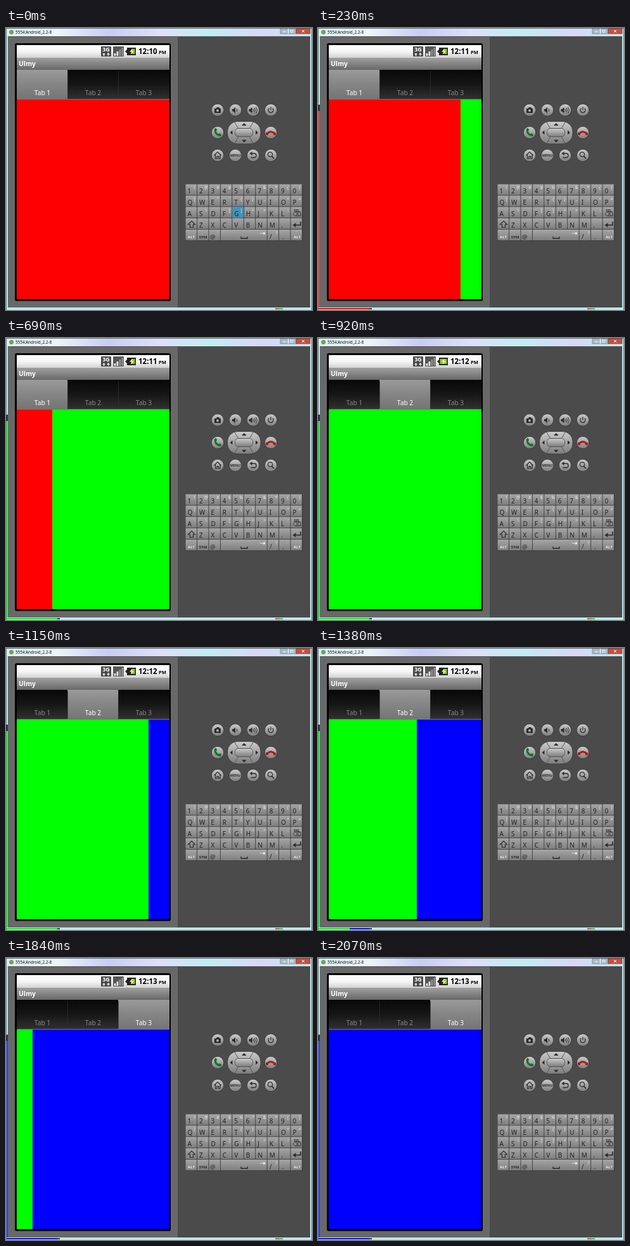
An HTML page that plays this animation: 483 by 445 pixels, repeating every 2300 ms.

```html
<!DOCTYPE html>
<html lang="en">
<head>
<meta charset="utf-8">
<title>Emulator</title>
<style>
  html, body { margin: 0; width: 100%; height: 100%; overflow: hidden; }
  svg { display: block; width: 483px; height: 445px; }
  text { font-family: "Noto Sans", "Open Sans", sans-serif; white-space: pre; }
</style>
</head>
<body>
<script>
const NS = "http://www.w3.org/2000/svg";
const RED = "#f00", GREEN = "#0f0", BLUE = "#00f";

function el(name, attrs, parent = svg) {
  const node = document.createElementNS(NS, name);
  for (const k in attrs) node.setAttribute(k, attrs[k]);
  if (parent) parent.append(node);
  return node;
}
const svg = el("svg", { viewBox: "0 0 483 445" }, document.body);
const defs = el("defs", {});

function gradient(id, stops, across = false) {
  const g = el("linearGradient", { id, x2: across ? 1 : 0, y2: across ? 0 : 1 }, defs);
  stops.forEach((c, i) => el("stop", { offset: i / (stops.length - 1), "stop-color": c }, g));
  return `url(#${id})`;
}
const rect = (x, y, width, height, fill, more = {}) =>
  el("rect", { x, y, width, height, fill, ...more });
const path = (d, fill, more = {}) => el("path", { d, fill, ...more });
const stroke = (d, color, width = 1) =>
  path(d, "none", { stroke: color, "stroke-width": width });
function text(str, x, y, size, fill, more = {}) {
  const t = el("text", { x, y, "font-size": size, fill, ...more });
  t.textContent = str;
  return t;
}
const MID = { "text-anchor": "middle" };

const glass = gradient("glass", ["#d8eef2", "#eef4fa", "#c9cdf2", "#dfdff8", "#c4ecf2", "#d9d8f6", "#bfe9f0"], true);
const bar = gradient("bar", ["#ffffff", "#f6f6f6", "#d2d2d2"]);
const titleFill = gradient("title", ["#a0a0a0", "#686868"]);
const tabOn = gradient("tabOn", ["#9a9a9a", "#858585", "#757575"]);
const tabOff = gradient("tabOff", ["#080808", "#161616", "#303030"]);
const button = gradient("button", ["#cccccc", "#7c7c7c"]);
const keyFill = gradient("key", ["#a6a6a6", "#7e7e7e"]);

// Window frame
rect(0, 0, 483, 445, "#bfe6ec");
rect(0, 0, 483, 13, glass);
rect(0, 0, 483, 1, "#4c7078");
rect(0, 1, 1, 444, "#5c8890");
rect(482, 1, 1, 444, "#5c8890");
el("circle", { cx: 8.5, cy: 6.5, r: 3.5, fill: "#7c9c54" });
text("5554:Android_2.2-8", 15, 9, 6.3, "#111", { "font-family": "sans-serif" });
rect(433, 1, 25, 8, "#a9bac8", { stroke: "#60717f", "stroke-width": .6 });
rect(458, 1, 22, 8, "#c85040", { stroke: "#702c24", "stroke-width": .6 });
stroke("M437 6H442M445.5 1V9", "#fff");
rect(449, 3.5, 4, 3, "none", { stroke: "#fff", "stroke-width": .8 });
stroke("M467 3L471 7M471 3L467 7", "#fff");

// Glass edges tinted by what lies behind the window
const side = rect(1, 131, 2, 310, RED);
const sideGap = rect(0, 121, 3, 10, "#26384c");
const edgeA = rect(1, 442, 1, 2, RED);
const edgeB = rect(1, 442, 1, 2, GREEN);
const edgeGap = rect(81, 442, 4, 2, "#243c40");
rect(425, 442, 6, 2, "#b06058");
rect(431, 442, 6, 2, "#48b860");

rect(3, 13, 268, 428, "#686868");
rect(271, 13, 209, 428, "#4b4b4b");
rect(3, 13, 477, 1, "#565656");

// Phone screen
rect(14, 24, 246, 407, "#000", { rx: 3 });
rect(17, 27, 241, 20, bar);
rect(17, 47, 241, 19, titleFill);
text("Ulmy", 20, 60, 10.3, "#fff", { "font-weight": 700 });

rect(150, 29, 16, 16, "#484848", { rx: 1 });
text("3G", 158, 37, 9, "#fff", { "font-weight": 700, ...MID });
path("M152 42L154.5 39L157 42H155.5V44H153.5V42ZM159 41H160.5V39H162.5V41H164L161.5 44Z", "#ddd");
rect(169, 29, 17, 16, "#555", { rx: 1 });
[4, 7, 10, 13].forEach((h, i) => rect(170.5 + i * 4, 44 - h, 2.8, h, i < 2 ? "#e4e4e4" : "#909090"));
path("M188 37L191 34V31H205V43H191V40Z", "#222");
const charge = rect(194, 33, 9, 8, "#8ccc20");
path("M199.5 32.5L195 37.5H198L196.5 41.5L202 36.5H199Z", "#fff8a0");

const clock = text("", 209, 41, 11.5, "#000", { "font-weight": 700 });
text("PM", 241, 41, 7.6, "#000", { "font-weight": 700 });

rect(17, 66, 241, 48, "#000");
const tabs = [0, 1, 2].map(i => ({
  box: rect(17 + i * 80, 66, i < 2 ? 80 : 81, 46, tabOff),
  label: text(`Tab ${i + 1}`, 57.5 + i * 80, 106, 10.2, "#888", MID)
}));
stroke("M97.5 68V111M177.5 68V111", "#333", .7);
rect(17, 112, 241, 1, "#777");
const pageA = rect(17, 113, 241, 315, RED);
const pageB = rect(17, 113, 0, 315, GREEN);

// Hardware buttons
const INK = "#2b2b2b";
function knob(x, y) {
  el("circle", { cx: x, cy: y, r: 9.7, fill: button, stroke: "#333", "stroke-width": .8 });
}
for (const y of [129.5, 165, 201])
  for (const x of [334, 362, 390, 418])
    if (y !== 165 || x === 334 || x === 418) knob(x, y);

path("M329 127H331.5L333 125H336L337.5 127H339V134H329Z", INK);
el("circle", { cx: 334, cy: 130.3, r: 2, fill: "#aaa" });
function speaker(x) {
  path(`M${x} 128H${x + 2}L${x + 5} 125V134.5L${x + 2} 131.5H${x}Z`, INK);
}
speaker(357);
stroke("M364 127.5Q366 130 364 132", INK);
speaker(383.5);
stroke("M390 127.5Q392 130 390 132M392 126Q395 130 392 133.5M394.3 125Q398 130 394.3 135", INK);
stroke("M415.3 126.5A4 4 0 1 0 420.7 126.5M418 124.5V129.5", INK, 1.3);
stroke("M330 160.5Q330 168.5 338.5 169.5", "#0a7424", 3);
path("M328.5 160L331 157.5L333.5 161L330.5 163ZM335 168L337.5 166L340.5 169L338 171.5Z", "#0a7424");
stroke("M411.5 167Q418 160.5 424.5 167", "#b01818", 3);
path("M410 165H414V169H410ZM422 165H426V169H422Z", "#b01818");
stroke("M328.5 201L334 195.5L339.5 201M330.5 200V206H333V202.5H335.5V206H338V200", INK, 1.2);
text("MENU", 362, 203.2, 5.4, INK, { "font-weight": 700, ...MID });
stroke("M387 198H392Q395 198 395 201.3T391.5 204.5H386.5", INK, 1.3);
path("M384.5 198L388.5 195V201Z", INK);
el("circle", { cx: 417, cy: 199.5, r: 3.6, fill: "none", stroke: INK, "stroke-width": 1.3 });
stroke("M419.5 202.3L423 206", INK, 1.7);

// Direction pad
rect(349.5, 147.5, 52.5, 35.5, button, { rx: 16, stroke: "#333", "stroke-width": .8 });
stroke("M361 149L367 159M390 149L384 159M361 182L367 171M390 182L384 171", "#585858");
rect(361.5, 158.5, 28, 13, button, { rx: 5, stroke: "#555" });
path("M372 154L375.8 150L379.6 154ZM372 176.5H379.6L375.8 180.5ZM357.5 161.5V168.5L353.5 165ZM394 161.5V168.5L398 165Z", INK);

// Keyboard
const KX = 283.5, KY = 246.5, KW = 18.45, KH = 17.9;
const rows = ["1234567890", "QWERTYUIOP", "ASDFGHJKL ", " ZXCVBNM. "];
const alts = ["!@#$%^&*()", "|~\"`{}_-+=", " \\ []<>;: ", ""];
rect(283, 246, 185.5, 90, "#3a3a3a", { rx: 1 });
function key(col, row, span = 1, fill = keyFill) {
  return rect(KX + col * KW, KY + row * KH, span * KW - .9, KH - .9, fill);
}
let hot;
rows.forEach((row, r) => [...row].forEach((ch, c) => {
  key(c, r);
  const x = KX + c * KW, y = KY + r * KH;
  if (ch === "G") hot = key(c, r, 1, "#4094be");
  text(ch, x + 3, y + 14.4, 10, "#222");
  const alt = alts[r][c];
  if (alt) text(alt, x + 14, y + 7.2, 6.5, "#eee", MID);
}));
text("DEL", 459, 289.5, 5, INK, { "font-weight": 700, ...MID });
stroke("M453 293.5L456 290.5H465V296.5H456ZM458 292L462 295M462 292L458 295", INK, .9);
stroke("M287.5 310L293 304.5L298.5 310H295.5V314.5H290.5V310Z", INK, 1.1);
stroke("M465 305.5V311H456", INK, 1.7);
path("M452.5 311L457.5 307.5V314.5Z", INK);

[[0, 1], [1, 1], [2, 1], [3, 4], [7, 1], [8, 1], [9, 1]].forEach(([c, span]) => key(c, 4, span));
for (const x of [292.5, 459.5])
  text("ALT", x, 332, 6, "#eee", { "font-weight": 600, ...MID });
text("SYM", 311, 332, 6, INK, { "font-weight": 700, ...MID });
text("@", 322, 332.5, 9.5, "#222");
text("/", 416, 332.5, 10, "#222");
text("?", 427, 325.5, 6.5, "#eee", MID);
text(".", 436, 332.5, 10, "#222");
stroke("M371 329V332H381V329", INK, 1.3);
stroke("M401 324H408M408.5 322V326", "#eee", .9);
path("M406 321.8L408.5 324L406 326.2Z", "#eee");

// split x, left page, right page, tab, minute, battery full, edge split
const STEP = 230;
const steps = [
  [258, RED, GREEN, 0, 10, 0, -1],
  [225, RED, GREEN, 0, 11, 0, 81],
  [155, RED, GREEN, 0, 11, 0, 33],
  [73, RED, GREEN, 0, 11, 0, 0],
  [17, RED, GREEN, 1, 12, 1, 0],
  [225, GREEN, BLUE, 1, 12, 0, 81],
  [156, GREEN, BLUE, 1, 12, 0, 49],
  [88, GREEN, BLUE, 1, 13, 1, 0],
  [42, GREEN, BLUE, 2, 13, 0, 0],
  [17, GREEN, BLUE, 2, 13, 0, 0]
];

function set(node, attrs) {
  for (const k in attrs) node.setAttribute(k, attrs[k]);
}

function show(n) {
  const [split, left, right, tab, minute, full, edge] = steps[n];
  set(pageA, { width: split - 17, fill: left });
  set(pageB, { x: split, width: 258 - split, fill: right });
  tabs.forEach(({ box, label }, i) => {
    set(box, { fill: i === tab ? tabOn : tabOff });
    set(label, { fill: i === tab ? "#fff" : "#888" });
  });
  clock.textContent = `12:${minute}`;
  set(charge, full ? { x: 192.5, width: 11 } : { x: 198, width: 5.5 });
  set(hot, { opacity: n === 0 ? 1 : 0 });

  const tint = edge < 0 ? 0 : 1;
  for (const node of [side, sideGap, edgeA, edgeB, edgeGap]) set(node, { opacity: tint });
  const a = Math.max(edge, 0);
  set(side, { fill: edge > 0 ? left : right, opacity: tint * .75 });
  set(edgeA, { width: a, fill: left });
  set(edgeB, { x: 1 + a, width: 81 - a, fill: right });
}

let shown = -1;
const start = performance.now();
function tick() {
  const n = Math.floor((performance.now() - start) / STEP) % steps.length;
  if (n !== shown) show(shown = n);
  requestAnimationFrame(tick);
}
tick();
</script>
</body>
</html>
```
